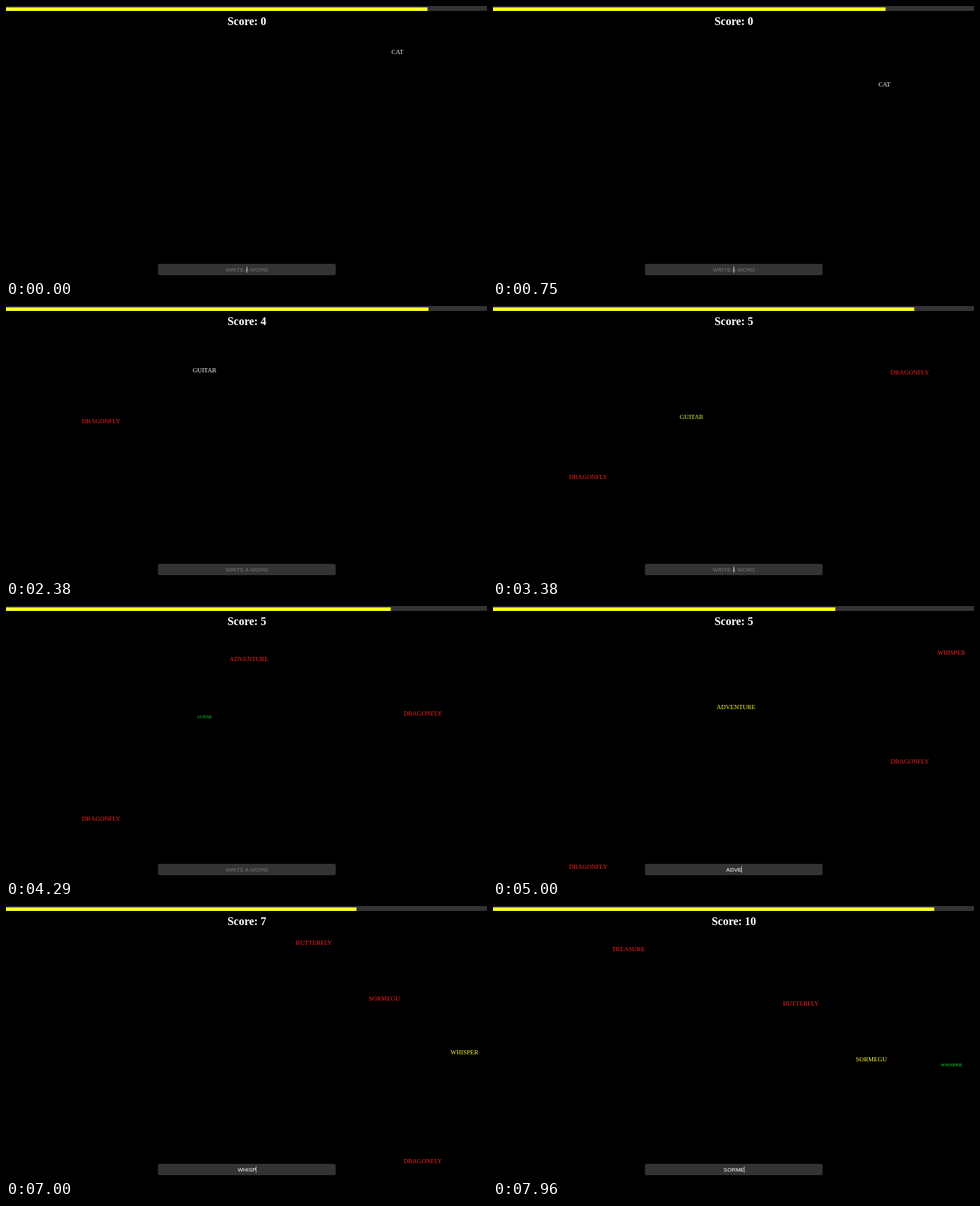
An HTML page that plays this animation: 682x385 px, repeating every 8000 ms.

```html
<!DOCTYPE html>
<html lang="en">
<head>
<meta charset="utf-8">
<title>Falling words</title>
<style>
  html, body { margin: 0; width: 100%; height: 100%; overflow: hidden; background: #000; }
  svg { display: block; width: 100%; height: 100%; }
  text { text-anchor: middle; white-space: pre; }
  #score { font: bold 16px "Liberation Serif", serif; fill: #fff; }
  #words { font: 9px "Liberation Serif", serif; }
  #input { font: 8px "Liberation Sans", sans-serif; }
</style>
</head>
<body>
<svg viewBox="0 0 682 385">
  <rect width="682" height="385"/>
  <rect width="682" height="7" fill="#333"/>
  <rect id="bar" y="2" height="5" fill="#ffff2a"/>
  <text id="score" x="341.5" y="27"></text>
  <g id="words"></g>
  <rect x="215.5" y="365" width="252" height="16" rx="2.5" fill="#333"/>
  <text id="input" x="341.5" y="376"></text>
  <rect id="caret" y="368.5" width="0.8" height="9" fill="#ddd"/>
</svg>
<script>
const LOOP = 8000, FALL = 77, DRAIN = 68.2, POP = 1.1;
const $ = id => document.getElementById(id);
const bar = $('bar'), score = $('score'), input = $('input'), caret = $('caret');

// Refresh moments: first, last, count
const runs = [
  [0, 0, 1], [40, 170, 4], [500, 1170, 15], [1210, 1460, 3], [1630, 2380, 6],
  [2500, 2630, 2], [2790, 3380, 5], [3500, 3670, 2], [3960, 5000, 7],
  [5170, 6130, 7], [6330, 7210, 6], [7420, 7960, 4]
];
const ticks = runs.flatMap(([a, b, n]) =>
  Array.from({ length: n }, (_, i) => n < 2 ? a : Math.round((a + (b - a) * i / (n - 1)) / 10) * 10));

// Clock in ms to game time in seconds
const clock = [
  [0, 0], [170, .175], [500, .36], [1170, 1.03], [1210, 1.13], [1460, 1.465],
  [2380, 2.345], [3380, 3.37], [5000, 5.01], [6130, 6.1], [7960, 7.955]
];

// Scale after a word is solved
const popScale = [[0, 1], [.4, 1], [.7, 1.43], [POP, 0]];

// solved: game time, points, bar gain in px
const words = [
  { text: 'CAT', x: 555, born: -.052, solved: 1.128, points: 4, gain: 161.4 },
  { text: 'DRAGONFLY', x: 135, born: 1.015 },
  { text: 'GUITAR', x: 281.5, born: 1.955, solved: 3.2, points: 1, gain: 68.2 },
  { text: 'DRAGONFLY', x: 591, born: 2.945 },
  { text: 'ADVENTURE', x: 344.5, born: 3.945, solved: 5.737, points: 2, gain: 136.4 },
  { text: 'WHISPER', x: 650, born: 4.945, solved: 7.07, points: 3, gain: 204.6 },
  { text: 'SORMEGU', x: 536.5, born: 5.935 },
  { text: 'BUTTERFLY', x: 436.5, born: 6.955 },
  { text: 'TREASURE', x: 192, born: 7.955 }
];

// Typing: text, first key, gap between keys, moment the field clears
const typing = [
  ['CAT', .76, .19, 1.128],
  ['GUITAR', 2.42, .156, 3.2],
  ['ADVENTURE', 4.46, .16, 5.737],
  ['S', 6.05, .1, 6.2],
  ['WHISPER', 6.29, .13, 7.07],
  ['SORME', 7.2, .15, 9]
];

for (const w of words) {
  w.el = document.createElementNS('http://www.w3.org/2000/svg', 'text');
  w.el.textContent = w.text;
  w.el.setAttribute('y', 3);
  $('words').append(w.el);
}

function lerp(points, x) {
  let i = 1;
  while (i < points.length - 1 && x > points[i][0]) i++;
  const [x0, y0] = points[i - 1], [x1, y1] = points[i];
  return y0 + (y1 - y0) * Math.min(1, (x - x0) / (x1 - x0));
}

function typedAt(g) {
  let text = '', last = 0;
  for (const [word, start, gap, end] of typing) {
    if (g >= end) last = end;
    else if (g >= start) {
      const n = Math.min(word.length, Math.floor((g - start) / gap + 1e-6) + 1);
      text = word.slice(0, n);
      last = start + (n - 1) * gap;
    }
  }
  return { text, last };
}

function drawWord(w, g, typed) {
  const age = g - w.solved;
  const done = age >= 0;
  const y = 61 + FALL * ((done ? w.solved : g) - w.born);
  const shown = y >= 38 && y < 400 && !(age >= POP);
  w.el.setAttribute('display', shown ? 'inline' : 'none');
  if (!shown) return;
  let fill = w.text.length < 7 ? '#fff' : '#f22';
  if (done) {
    const k = Math.min(1, age / .85);
    fill = `rgb(${255 - 221 * k},${255 - 20 * k},51)`;
  } else if (typed && w.text.startsWith(typed)) fill = '#ff3';
  w.el.setAttribute('fill', fill);
  w.el.setAttribute('transform', `translate(${w.x} ${y}) scale(${done ? lerp(popScale, age) : 1})`);
}

function draw(ms) {
  const g = lerp(clock, ticks.findLast(t => t <= ms));
  const { text, last } = typedAt(g);
  let points = 0, width = 597.5 - DRAIN * g;
  for (const w of words) {
    if (g >= w.solved) {
      points += w.points;
      width += w.gain;
    }
    drawWord(w, g, text);
  }
  bar.setAttribute('width', Math.min(682, width));
  score.textContent = 'Score: ' + points;
  input.textContent = text || 'WRITE A WORD';
  input.setAttribute('fill', text ? '#fff' : '#757575');
  const half = text ? input.getComputedTextLength() / 2 : 0;
  caret.setAttribute('x', 341.1 + half);
  caret.setAttribute('opacity', Math.floor((g - last) / .65) % 2 ? 0 : 1);
}

const start = performance.now();
function loop() {
  draw((performance.now() - start) % LOOP);
  requestAnimationFrame(loop);
}
loop();
</script>
</body>
</html>
```
